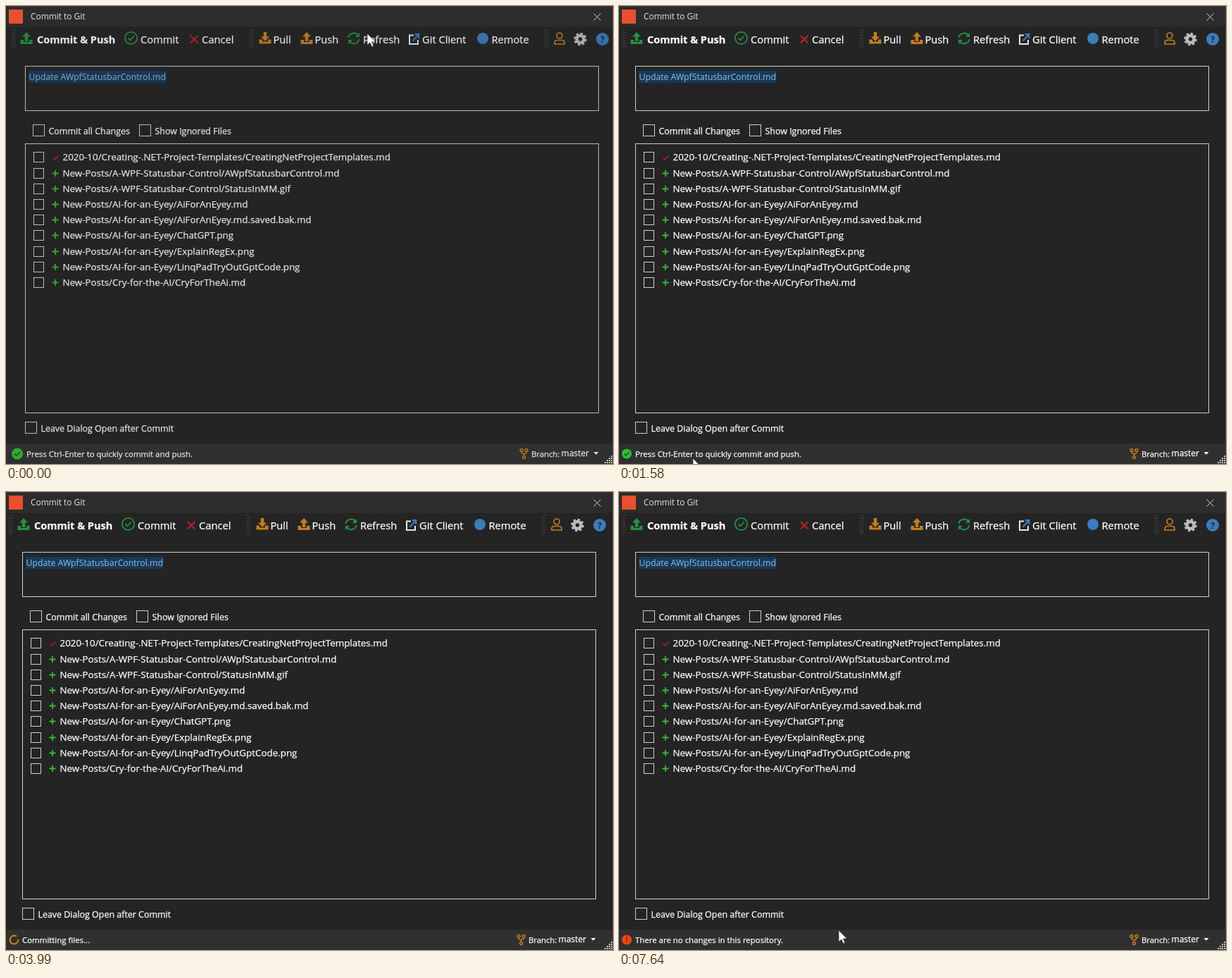
Animation, 862 px wide and 650 px high, one loop 8000 ms. Source, as an HTML page:

```html
<!DOCTYPE html>
<html lang="en">
<head>
<meta charset="utf-8">
<title>Commit to Git</title>
<style>
  html, body { margin: 0; width: 100%; height: 100%; overflow: hidden; background: #242424; }
  svg { display: block; width: 862px; height: 650px; font-family: "Open Sans", "Noto Sans", sans-serif; fill: #fff; }
  .tool { font-size: 14.7px; }
  .label { font-size: 12.45px; }
  .file { font-size: 13.36px; }
  .status { font-size: 11.45px; }
  .crisp text, text.crisp { stroke: #fff; stroke-width: .25px; }
  .line { fill: none; stroke: currentColor; }
  .box { fill: none; stroke: #d0d0d0; }
  .fill { fill: currentColor; }
  .green { color: #259044; }
  .orange { color: #c47d20; }
  .blue { color: #3a7dbd; }
  .red { color: #b5212a; }
</style>
</head>
<body>
<svg viewBox="0 0 862 650">
  <defs>
    <path id="tray" d="M-8.5 2H-4V5H4V2H8.5V8H-8.5Z"/>
    <path id="arrow" d="M0-9L6-2.5H2.2V4H-2.2V-2.5H-6Z"/>
    <g id="refreshHalf">
      <path class="line" stroke-width="2" d="M-7.5-1A7.5 7 0 0 1 6-4.5"/>
      <path class="fill" d="M8-8V-2H2Z"/>
    </g>
    <path id="check" class="line" d="M-4 0L-1.2 2.8L4.2-2.8"/>
    <pattern id="dots" width="4" height="4" patternUnits="userSpaceOnUse">
      <path fill="#666" d="M0 0h1v1h-1zM2 2h1v1h-1z"/>
    </pattern>
    <rect id="grip" width="5" height="28" fill="url(#dots)"/>
  </defs>

  <rect width="862" height="650" fill="#242424"/>
  <rect width="862" height="30" fill="#2c2c2c"/>
  <rect y="621" width="862" height="29" fill="#303030"/>
  <path d="M0 .5H862M861.5 0V650" stroke="#3c3c3c"/>
  <rect x="4" y="5" width="20" height="20" fill="#e8502f"/>
  <text x="35" y="19" font-size="11.9" fill="#e4e4e4">Commit to Git</text>
  <path d="M834.5 10.5l10 10m0-10l-10 10" stroke="#d8d8d8"/>

  <g id="content">
    <rect id="hover" x="158" y="31" width="92" height="30"/>
    <use href="#grip" x="4" y="33"/>
    <use href="#grip" x="342" y="33"/>
    <use href="#grip" x="761" y="33"/>

    <g transform="translate(25 46)" class="green fill"><use href="#tray"/><use href="#arrow"/></g>
    <g transform="translate(173.5 45.5)" class="green">
      <circle r="8.6" class="line" stroke-width="1.7"/><use href="#check" stroke-width="1.8"/>
    </g>
    <path class="line red" stroke-width="2.2" d="M258 42l10.5 10.5m0-10.5L258 52.5"/>
    <g transform="translate(364 45.5)" class="orange fill">
      <use href="#tray"/><use href="#arrow" transform="translate(0 -4.5) scale(1 -1)"/>
    </g>
    <g transform="translate(423 46)" class="orange fill"><use href="#tray"/><use href="#arrow"/></g>
    <g transform="translate(490 46)" class="green">
      <use href="#refreshHalf"/><use href="#refreshHalf" transform="rotate(180)"/>
    </g>
    <path d="M575 41.5H569V54H581V48" fill="none" stroke="#e8e8e8" stroke-width="2"/>
    <path class="blue line" stroke-width="2.2" d="M573.5 49.5L581.5 41M576.5 40.2H582.2V46"/>
    <circle cx="673" cy="46" r="8" class="blue fill"/>
    <g class="orange line" stroke-width="1.7">
      <circle cx="782" cy="42" r="4"/>
      <path d="M775 54V52Q775 48.5 779 48.5H785Q789 48.5 789 52V54Z"/>
    </g>
    <g fill="none" stroke="#bdbdbd">
      <circle cx="811.5" cy="47" r="5" stroke-width="4.5"/>
      <circle cx="811.5" cy="47" r="8" stroke-width="2.6" stroke-dasharray="3.4 2.883"/>
    </g>
    <circle cx="843" cy="47" r="9" class="blue fill"/>
    <text x="843" y="51.5" font-size="12" font-weight="700" text-anchor="middle" fill="#242424">?</text>

    <g class="tool crisp">
      <text x="40" y="52.5" font-size="14.5" font-weight="700" stroke="none">Commit &amp; Push</text>
      <text x="187" y="52.5">Commit</text>
      <text x="274" y="52.5">Cancel</text>
      <text x="375.5" y="52.5">Pull</text>
      <text x="434.5" y="52.5">Push</text>
      <text x="503" y="52.5">Refresh</text>
      <text x="587" y="52.5">Git Client</text>
      <text x="685.5" y="52.5">Remote</text>
    </g>

    <rect class="box" x="23.5" y="85.5" width="814" height="63"/>
    <rect x="28" y="92" width="196" height="17" fill="#183a5a"/>
    <text x="28.5" y="105" font-size="12.25" fill="#93bce0">Update AWpfStatusbarControl.md</text>

    <g class="label crisp">
      <rect class="box" x="34.5" y="168.5" width="16" height="16"/>
      <text x="56.5" y="182">Commit all Changes</text>
      <rect class="box" x="185.5" y="168.5" width="16" height="16"/>
      <text x="207.5" y="182">Show Ignored Files</text>
      <rect class="box" x="23.5" y="590.5" width="16" height="16"/>
      <text x="45.5" y="604">Leave Dialog Open after Commit</text>
    </g>
    <rect class="box" x="23.5" y="195.5" width="814" height="382"/>
    <g id="files" class="file crisp"></g>

    <g id="badge">
      <circle r="7" class="fill"/>
      <use id="badgeCheck" href="#check" stroke-width="1.3" color="#173f17" transform="scale(.85)"/>
      <path id="badgeBang" d="M0-4V1.2M0 2.6V4" stroke="#5a1d10" stroke-width="1.4"/>
    </g>
    <circle id="spinner" class="line" color="#c98a22" r="5.9" stroke-width="2" stroke-dasharray="31 6.07"/>
    <text id="message" class="status crisp" y="640"></text>

    <g class="orange line" stroke-width="1.5">
      <circle cx="728" cy="630.5" r="1.9"/>
      <circle cx="735" cy="630.5" r="1.9"/>
      <circle cx="731.5" cy="640.5" r="1.9"/>
      <path d="M728 632.5Q728 635.5 731.5 635.5T735 632.5M731.5 635.5V638.5"/>
    </g>
    <g class="crisp">
      <text x="742" y="640" font-size="11.3">Branch:</text>
      <text x="784.5" y="639" font-size="12">master</text>
    </g>
    <path d="M830.5 633h7l-3.5 3.8z"/>
  </g>

  <path id="resizer" fill="#c4c4c4"/>
  <circle id="click" cx="211" cy="51" r="10.5" fill="#d8cc20" opacity=".75"/>
  <path id="cursor" d="M0 0V16.5L3.9 13L6.5 19L9 18L6.5 12H11.8Z" stroke="#222" stroke-width=".7"/>
</svg>

<script>
const $ = id => document.getElementById(id);
const LOOP = 8000;

const files = [
  "2020-10/Creating-.NET-Project-Templates/CreatingNetProjectTemplates.md",
  "New-Posts/A-WPF-Statusbar-Control/AWpfStatusbarControl.md",
  "New-Posts/A-WPF-Statusbar-Control/StatusInMM.gif",
  "New-Posts/AI-for-an-Eyey/AiForAnEyey.md",
  "New-Posts/AI-for-an-Eyey/AiForAnEyey.md.saved.bak.md",
  "New-Posts/AI-for-an-Eyey/ChatGPT.png",
  "New-Posts/AI-for-an-Eyey/ExplainRegEx.png",
  "New-Posts/AI-for-an-Eyey/LinqPadTryOutGptCode.png",
  "New-Posts/Cry-for-the-AI/CryForTheAi.md"
];
$("files").innerHTML = files.map((name, i) => {
  const y = Math.round(214.3 + 22.2 * i);
  const mark = i
    ? `<path d="M61.5 ${y + .5}h9m-4.5-4.5v9" stroke="#32bc3c" stroke-width="1.8"/>`
    : `<use href="#check" x="66.5" y="${y + 1}" class="red" stroke-width="1.5"/>`;
  return `<rect class="box" x="35.5" y="${y - 6.5}" width="14" height="14"/>${mark}
    <text x="76.5" y="${y + 5}">${name}</text>`;
}).join("");

// Triangle of dots in the window corner
let dots = "";
for (let row = 0; row < 4; row++)
  for (let col = 0; col <= row; col++) dots += `M${859 - 3 * col} ${638 + 3 * row}h2v2h-2z`;
$("resizer").setAttribute("d", dots);

// Cursor stops: time, x, y
const stops = [
  [0, 513, 39], [60, 513, 39], [570, 114, 592], [860, 104, 628], [1150, 105, 642],
  [1870, 105, 642], [2610, 211, 51], [3260, 211, 51], [3900, 142, 655],
  [4450, 138, 655], [4880, 156, 630], [5400, 220, 623], [6640, 220, 623],
  [7000, 290, 618], [7350, 312, 622], [LOOP, 312, 622]
];

function cursorAt(t) {
  const i = stops.findIndex(stop => stop[0] > t);
  const [t0, x0, y0] = stops[i - 1], [t1, x1, y1] = stops[i];
  const p = (t - t0) / (t1 - t0), k = p * p * (3 - 2 * p);
  return [x0 + (x1 - x0) * k, y0 + (y1 - y0) * k];
}

// The badge swells from 14 to 22 pixels, then settles back.
function badgeSize(age) {
  const rise = age / 700, fall = (1560 - age) / 860;
  return 14 + 8 * Math.max(0, Math.min(rise, fall));
}

const show = (id, visible) => $(id).style.display = visible ? "" : "none";

function draw(t) {
  const busy = t >= 3330 && t < 6050, failed = t >= 6050;
  const size = busy ? 14 : badgeSize(failed ? t - 6080 : t + 180);
  const shift = t < 60 ? 4 : t < 130 ? 2 : 0;
  $("content").setAttribute("transform", `translate(${shift} 0)`);
  $("content").setAttribute("opacity", t < 60 ? .88 : 1);

  show("badge", !busy);
  show("badgeCheck", !failed);
  show("badgeBang", failed);
  show("spinner", busy);
  $("badge").setAttribute("color", failed ? "#f24410" : "#2fbb35");
  $("badge").setAttribute("transform", `translate(${4 + size / 2} 635.5) scale(${size / 14})`);
  $("spinner").setAttribute("transform", `translate(11.5 635.5) rotate(${t * .36 % 360})`);
  $("message").setAttribute("x", 9 + size);
  $("message").textContent = busy ? "Committing files..."
    : failed ? "There are no changes in this repository."
    : "Press Ctrl-Enter to quickly commit and push.";

  const pressed = t >= 3110 && t < 3260;
  show("click", pressed);
  show("hover", t >= 2540 && t < 3400);
  $("hover").setAttribute("fill", pressed ? "#1e4166" : "#2a3a4a");
  $("hover").setAttribute("stroke", pressed ? "#25527f" : "none");
  $("cursor").setAttribute("transform", `translate(${cursorAt(t)})`);
}

const start = performance.now();
function tick() {
  draw((performance.now() - start) % LOOP);
  requestAnimationFrame(tick);
}
tick();
</script>
</body>
</html>
```
